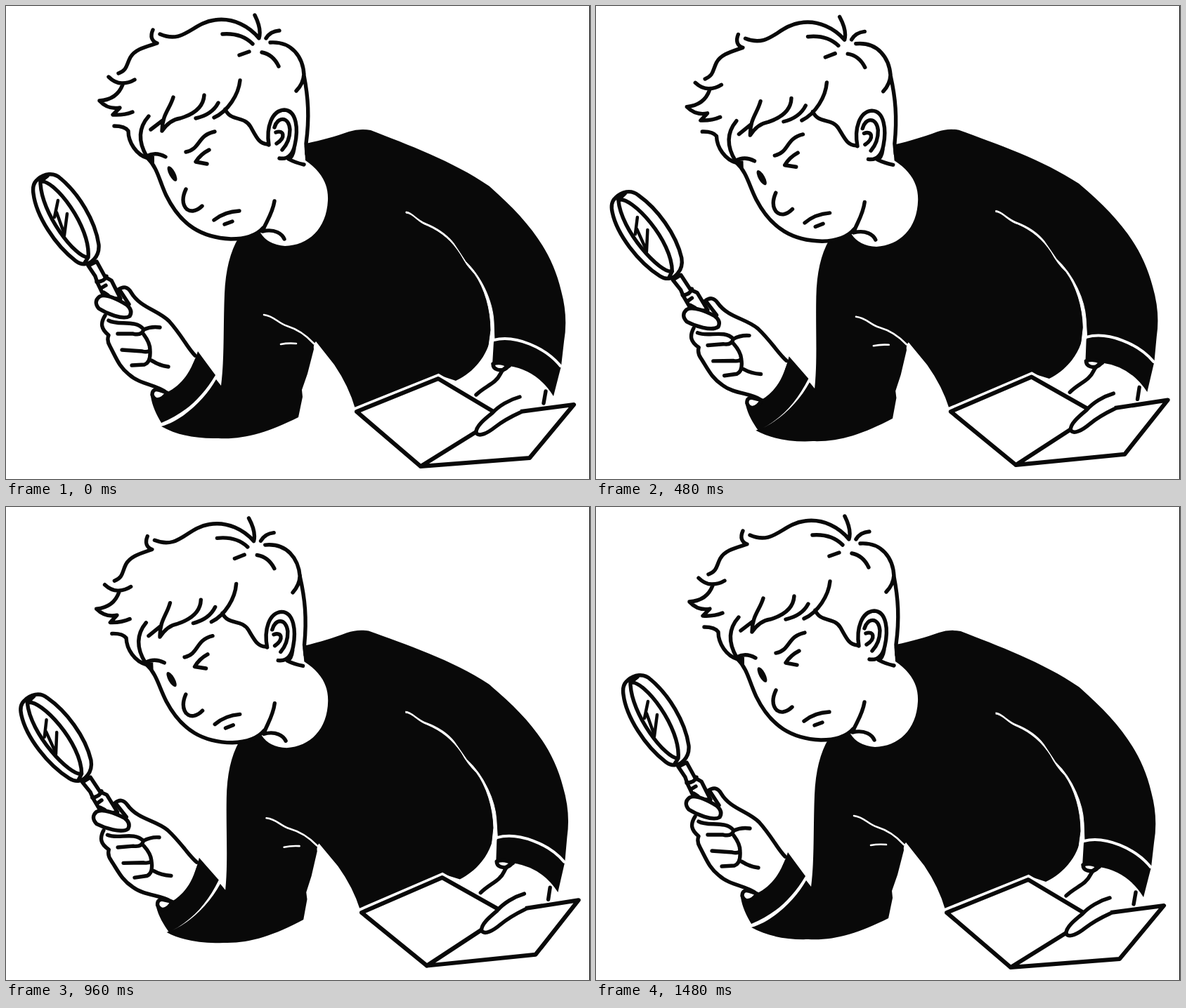
An HTML page that plays this animation: 831x674 px, repeating every 1.52 s.

```html
<!DOCTYPE html>
<html lang="en">
<head>
<meta charset="utf-8">
<title>Man with a magnifying glass</title>
<style>
  html, body { margin: 0; height: 100%; overflow: hidden; background: #fff; }
  svg { display: block; width: 831px; height: 674px; }
  .line { fill: none; stroke: #090909; stroke-width: 5.4; stroke-linecap: round; stroke-linejoin: round; }
  .paper { fill: #fff; }
  .ink { fill: #090909; }
  .seam { fill: none; stroke: #fff; stroke-width: 2.6; stroke-linecap: round; }
</style>
</head>
<body>
<svg viewBox="0 0 831 674">
  <g id="body">
    <!-- sweater, left sleeve and right arm -->
    <path class="ink" d="M427 196 C450 191 468 186 488 179 Q503 174 519 177
      C570 197 638 222 688 257 C741 304 776 346 790 406 Q800 443 794 478 L790 513 L779 556
      Q756 519 716 513 L692 512 L694 478 L690 468 C688 492 670 520 640 534 L616 526 L497 574
      Q488 542 467 511 L441 478 Q437 482 438 489 L429 524 L421 547 L422 557 L416 586
      C372 608 338 618 302 616 C270 617 242 611 221 599
      C250 591 282 562 299 532 L306 541 C311 500 309 458 311 410 Q313 360 331 330 Z"/>
    <path class="paper" stroke="#fff" d="M569 293 C577 293 585 305 598 310 C613 316 628 326 637 338
      L654 364 C679 388 693 424 694 450 L695 476 L686 492 L690 462 C690 432 681 402 667 382
      Q655 370 647 354 C635 335 620 322 600 313 C585 308 580 296 569 295 Z"/>
    <path class="seam" d="M367 440 C382 442 387 452 400 456 S427 469 438 481"/>
    <path class="seam" d="M391 482 Q401 480 413 481"/>
    <path class="seam" style="stroke-width:4" d="M694 476 C725 468 768 487 789 513"/>

    <!-- book -->
    <path class="paper" stroke="#fff" stroke-width="13" d="M498 578 L615 531 L692 577 L590 656 Z"/>
    <g class="line" style="stroke-width:6">
      <path class="paper" d="M590 656 L745 644 L808 568 L732 578 L692 577 Z" stroke="none"/>
      <path d="M692 577 L615 531 L499 578 L590 656 L680 600 M590 656 L745 644 L808 568 L732 578"/>
    </g>
    <!-- hand resting on the book -->
    <g class="line">
      <path class="paper" d="M693 510 Q704 506 715 513 Q709 521 699 518 Q693 516 693 510"/>
      <path d="M669 554 C681 542 697 538 703 525 Q707 516 716 513 M768 549 L765 566"/>
      <path class="paper" d="M731 557 C716 561 701 570 692 580 C682 588 668 599 669 608
        C673 615 686 608 696 600 Q710 589 732 579"/>
    </g>
  </g>

  <g id="arm">
    <path class="ink" d="M273 492 L298 526 C278 559 255 580 221 594 C214 582 208 570 206 556
      L228 550 C249 538 265 517 273 492 Z"/>
    <g class="line">
      <!-- hand -->
      <path class="paper" d="M162 404 Q171 396 178 408 C191 430 216 433 232 449
        C250 469 258 487 269 500 C263 522 249 541 228 551 C211 540 183 540 167 518
        C157 503 151 493 146 482 Q149 475 145 469 C134 460 135 449 141 441 L165 412 Z"
        stroke="none"/>
      <path d="M160 404 Q171 396 178 408 C191 430 216 433 232 449 C250 469 258 487 269 498
        M141 441 C134 452 135 460 146 469 Q143 477 148 485 C157 502 161 514 175 525
        C190 539 215 540 227 550"/>
      <path d="M146 448 C160 456 184 446 196 461 Q193 470 181 467 L159 467
        M196 461 Q207 456 219 458 M196 468 Q205 480 205 490 Q202 494 194 492 L165 490
        M205 491 Q206 508 197 511 L179 512 M207 505 Q217 512 231 514"/>
      <path class="paper" d="M208 554 Q208 545 217 547 L229 551 Q224 560 215 561 Q210 560 208 554"/>
      <!-- handle -->
      <path class="paper" d="M117 370 L127 385 L130 394 L141 417 L163 417 L150 391 L141 386 L129 364 Z"/>
      <path d="M129 393 Q140 393 143 385 M137 401 L142 398 M139 408 L145 412"/>
      <path class="paper" d="M133 414 C142 409 161 419 172 426 Q181 434 176 442
        C166 448 143 438 132 431 Q124 421 133 414 Z"/>
      <path d="M162 405 L175 425"/>
      <!-- lens -->
      <path class="paper" d="M45 247 C54 239 68 236 78 246 C103 267 127 305 132 340
        Q133 353 125 361 C118 369 108 370 99 363 C70 341 43 299 39 267 Q37 253 45 247 Z"/>
      <path d="M49 250 C69 246 121 315 117 358 C100 360 49 295 49 250 M49 250 L59 242 M117 358 L112 366"/>
      <path style="stroke-width:4.5" d="M74 277 L69 301 M72 294 L83 325 M87 296 L83 327"/>
    </g>
  </g>

  <g id="head">
    <path class="paper" d="M424 185 L426 220 C449 236 459 254 458 277 C456 318 430 341 397 342
      Q372 340 362 323 Q346 334 320 332 L300 200 Z"/>
    <g class="line">
      <!-- hair -->
      <path d="M209 34 C205 43 207 50 215 53 C200 58 184 61 177 73 C171 84 173 91 160 96"/>
      <path d="M219 40 C253 55 265 24 297 20 C324 16 347 30 360 46 Q364 33 354 13"/>
      <path d="M308 40 Q335 38 351 54 M370 46 Q376 36 389 35 M332 70 L346 65 M364 66 Q380 69 388 86"/>
      <path d="M376 52 C407 50 423 73 424 99 C430 130 432 158 427 196 L428 211 M424 97 Q423 111 413 121"/>
      <path d="M146 101 Q155 110 165 110 Q175 110 183 105 M166 112 C160 128 148 134 133 135
        Q145 148 162 145 L152 155 Q168 156 180 151"/>
      <path d="M154 171 Q169 171 174 178 C174 194 185 212 202 217"/>
      <path d="M203 157 C188 174 188 193 200 214 Q213 207 227 215"/>
      <path d="M238 130 C233 147 222 155 222 178 Q233 162 248 160 C268 154 281 144 282 127
        M206 176 L223 163 M270 160 Q293 155 302 138"/>
      <path d="M333 106 C331 126 316 150 296 159 M312 147 C319 165 339 156 348 172 S360 196 372 197"/>
      <!-- face -->
      <path d="M201 216 C216 231 218 249 228 270 C249 313 279 330 320 332 Q352 332 366 316"/>
      <path d="M256 208 C277 204 272 184 297 179 M289 205 Q277 211 270 222 L286 225"/>
      <path d="M256 261 C247 280 255 293 266 292 Q273 291 279 285
        M296 305 Q311 293 332 292 M311 311 L322 307"/>
      <path d="M382 278 C379 297 369 309 365 321 C383 317 393 325 396 332"/>
      <!-- ear -->
      <path d="M374 198 C370 173 378 149 396 148 C414 149 416 176 411 198 C408 212 401 219 389 217
        M410 203 Q408 216 402 218 Q411 223 424 226"/>
      <path d="M382 173 C386 158 402 156 404 176 Q404 193 393 205
        M384 180 C395 176 399 187 385 196"/>
    </g>
    <ellipse class="ink" cx="236.500" cy="239" rx="4.500" ry="12" transform="rotate(-28 236.500 239)"/>
    <path class="ink" d="M198 213 L211 214 L211 230 Z"/>
  </g>
  <rect class="ink" x="830" width="1" height="674"/>
</svg>
<script>
  const LOOP = 1520, STEP = 40;
  // Each part sways about its own pivot; peak is the time of its widest turn.
  const parts = [
    { id: 'body', angle: 1.72, x: 500, y: 300, peak: 760 },
    { id: 'arm',  angle: 6.3,  x: 362, y: 475, peak: 740 },
    { id: 'head', angle: 2.3,  x: 435, y: 270, peak: 755 },
  ];

  function draw() {
    const time = Math.floor(performance.now() % LOOP / STEP) * STEP;
    for (const { id, angle, x, y, peak } of parts) {
      const sway = (1 + Math.cos((time - peak) / LOOP * 2 * Math.PI)) / 2;
      document.getElementById(id).setAttribute('transform', `rotate(${-angle * sway} ${x} ${y})`);
    }
    requestAnimationFrame(draw);
  }
  draw();
</script>
</body>
</html>
```
